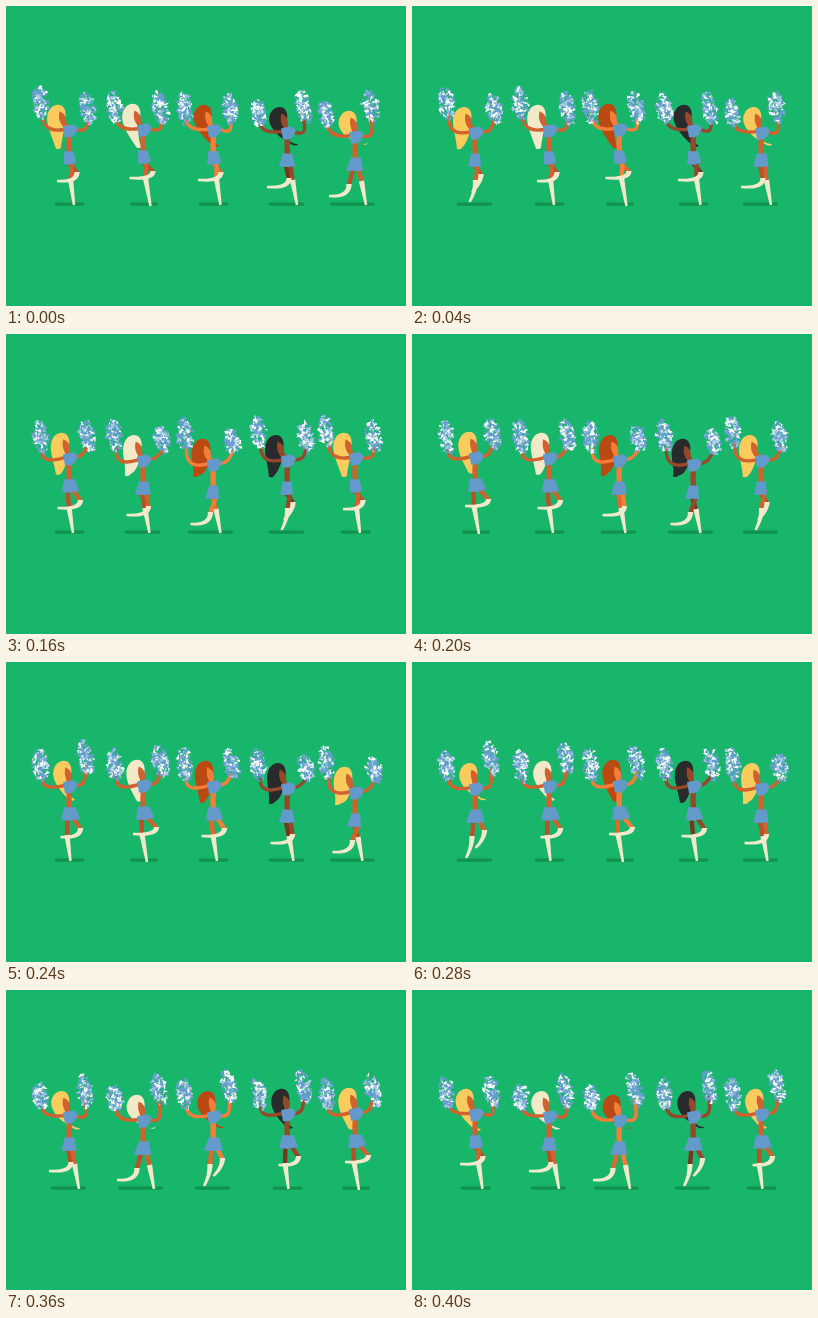
These frames come from a looping animation (400 by 300 pixels, 0.48 s). An HTML page with a canvas:

```html
<!DOCTYPE html>
<html>
<head>
<meta charset="utf-8">
<title>Cheerleaders</title>
<style>
html, body { margin: 0; height: 100%; overflow: hidden; background: #17b66b; }
canvas { display: block; }
</style>
</head>
<body>
<canvas id="stage" width="400" height="300"></canvas>
<script>
const ctx = document.getElementById('stage').getContext('2d');
const STEP = 40, LOOP = 480, PHASES = 12;
const BLUE = '#649acb', SOCK = '#f2e9cc', SHADOW = '#12924f';

const dancers = [
  { x: 0, hair: '#fccb5e', skin: '#cf622f', shade: '#b9502a' },
  { x: 74, hair: '#f2e9c8', skin: '#cf622f', shade: '#b9502a' },
  { x: 144, hair: '#bb4912', skin: '#f57d3a', shade: '#e2672d' },
  { x: 218, hair: '#292a2b', skin: '#95482a', shade: '#783720' },
  { x: 286, hair: '#fccb5e', skin: '#cf622f', shade: '#b9502a' }
];

// Left leg over one cycle: knee x, knee y, toe x, toe y. The right leg is half a cycle later.
const legPoses = [
  [71, 166, 51, 175], [69, 168, 60, 186], [66, 175, 70.5, 199], [65, 174, 69.5, 199],
  [63, 173, 67, 199], [62, 172, 67, 200], [61, 173, 64.5, 199], [60, 174, 54, 196],
  [57, 178, 37, 190], [65, 172, 43, 181], [71, 166, 48, 174], [73, 165, 49.5, 172]
];
const pomHeights = [97, 97.5, 101, 102, 103, 103, 104, 104, 108.5, 106.5, 102.5, 101];

const wave = (p, peak) => Math.cos((p - peak) * 2 * Math.PI / PHASES);
const opposite = p => (p + PHASES / 2) % PHASES;

function random(seed) {
  let s = seed * 7919 + 17;
  return () => (s = (s * 16807) % 2147483647) / 2147483647;
}

function fill(color, points) {
  ctx.fillStyle = color;
  ctx.beginPath();
  points.forEach(([x, y]) => ctx.lineTo(x, y));
  ctx.fill();
}

function limb(color, width, x0, y0, cx, cy, x1, y1) {
  ctx.strokeStyle = color;
  ctx.lineWidth = width;
  ctx.beginPath();
  ctx.moveTo(x0, y0);
  ctx.quadraticCurveTo(cx, cy, x1, y1);
  ctx.stroke();
}

function sock([kx, ky, fx, fy]) {
  const raised = kx - fx > 12;
  const cx = kx > fx ? kx : (kx + fx) / 2;
  const cy = raised ? fy + 1.5 : (ky + fy) / 2;
  const near = [], far = [];
  for (let t = 0; t <= 1.001; t += 0.1) {
    const u = 1 - t;
    const x = u * u * kx + 2 * u * t * cx + t * t * fx;
    const y = u * u * ky + 2 * u * t * cy + t * t * fy;
    const dx = u * (cx - kx) + t * (fx - cx), dy = u * (cy - ky) + t * (fy - cy);
    const w = (2.7 - 1.5 * t) / Math.hypot(dx, dy);
    near.push([x - dy * w, y + dx * w]);
    far.unshift([x + dy * w, y - dx * w]);
  }
  fill(SOCK, near.concat(far));
}

function pom(x, y, p, tilt, seed) {
  const rnd = random(seed);
  const h = 16.5 - 4 * Math.max(0, wave(p, 8.3)) ** 4;
  for (let i = 0; i < 130; i++) {
    const a = rnd() * 2 * Math.PI, r = rnd() ** 0.6;
    const dy = Math.sin(a) * r * h;
    const px = x + Math.cos(a) * r * 7.5 + dy * tilt, py = y + dy;
    const turn = rnd() * 2 * Math.PI, size = 1.2 + rnd() * 2;
    const tone = rnd();
    fill(i < 55 || tone < 0.35 ? '#6c9dd2' : tone < 0.75 ? '#fff' : '#a9c8e6',
      [0, 2.3, 3.4].map(k => [px + Math.cos(turn + k) * size, py + Math.sin(turn + k) * size]));
  }
}

function drawHead(d, left, top, p) {
  const tailX = 59 - 14 * wave(p, 2), tailY = 140.5 + 2.5 * wave(p, 1);
  ctx.fillStyle = d.hair;
  ctx.beginPath();
  ctx.moveTo(left + 18, top + 10);
  ctx.bezierCurveTo(left + 18, top - 1, left + 8, top - 2, left + 3, top + 4);
  ctx.bezierCurveTo(left - 5, top + 14, left + 3, top + 28, tailX - 2, tailY);
  ctx.quadraticCurveTo(tailX + 2, tailY + 1, tailX + 3, tailY - 1);
  ctx.bezierCurveTo(left + 14, top + 36, left + 17, top + 26, left + 18, top + 10);
  ctx.fill();
  limb(d.skin, 5, left + 15, top + 16, left + 16, top + 20, 62.5, top + 24);
  ctx.fillStyle = d.skin;
  ctx.beginPath();
  ctx.moveTo(left + 12, top + 7);
  ctx.quadraticCurveTo(left + 19, top + 10, left + 18.5, top + 17);
  ctx.quadraticCurveTo(left + 17, top + 22, left + 14, top + 20);
  ctx.quadraticCurveTo(left + 10, top + 15, left + 12, top + 7);
  ctx.fill();
}

function drawDancer(d, p, seed) {
  const fromLanding = Math.abs((p + 1) % 6 - 3);
  const drop = ((3 - fromLanding) / 3) ** 2;
  const top = 97.5 + 7 * drop, waist = top + 47;
  const flare = (1 - wave(p, 0)) / 2;
  const lean = 1.3 * wave(2 * p, 10);
  const left = 44.5 - 3 * wave(p, 0.5);
  const legL = legPoses[p];
  const legR = legPoses[opposite(p)].map((v, i) => i % 2 ? v : v + 3.5);
  const pomL = pomHeights[p], pomR = pomHeights[opposite(p)] - 1;
  const pomX = 80.5 + 1.8 * wave(p, 2);
  const reach = wave(p, 3.5);

  ctx.save();
  ctx.translate(d.x, 0);

  ctx.fillStyle = SHADOW;
  ctx.beginPath();
  ctx.roundRect(50 - 12 * drop, 196.5, 28 + 17 * drop, 3.2, 1.6);
  ctx.fill();

  drawHead(d, left, top, p);

  [[61.5, legL, d.shade], [66.5, legR, d.skin]].forEach(([hip, [kx, ky], color]) =>
    limb(color, 4.4, hip, waist + 10, (hip + kx) / 2, (waist + 10 + ky) / 2, kx, ky + 1));
  sock(legL);
  sock(legR);

  limb(d.skin, 5.4, 63.5, top + 30, 62.5, top + 40, 63.5, waist + 2);
  limb(d.skin, 3.4, 59, top + 25, 37 - 3 * reach, top + 30 + 3 * reach, 36.5, pomL + 13);
  limb(d.skin, 3.4, 70, top + 25, 81 - 4 * reach, top + 28 - 4 * reach, pomX, pomR + 11);

  fill(BLUE, [[57, top + 22], [61, top + 21], [68, top + 20], [72, top + 24],
    [69, top + 30], [65, top + 33], [59, top + 33]]);
  fill(BLUE, [[58.5 - lean / 2, waist], [67.5 + flare * 2, waist],
    [69.5 + flare * 4 + lean, waist + 12 - lean],
    [64 + lean, waist + 13.5], [57 - flare * 2.5 + lean, waist + 13]]);

  pom(34.5, pomL, p, 0.1, seed);
  pom(pomX, pomR, opposite(p), 0.18, seed + 1);
  ctx.restore();
}

function draw(now) {
  const step = Math.min(10, Math.floor(now % LOOP / STEP));
  ctx.fillStyle = '#17b66b';
  ctx.fillRect(0, 0, 400, 300);
  dancers.forEach((d, i) =>
    drawDancer(d, (step - i + PHASES) % PHASES, 1 + step * 10 + i * 2));
  requestAnimationFrame(() => draw(performance.now() - start));
}

ctx.lineCap = 'round';
const start = performance.now();
draw(0);
</script>
</body>
</html>
```
